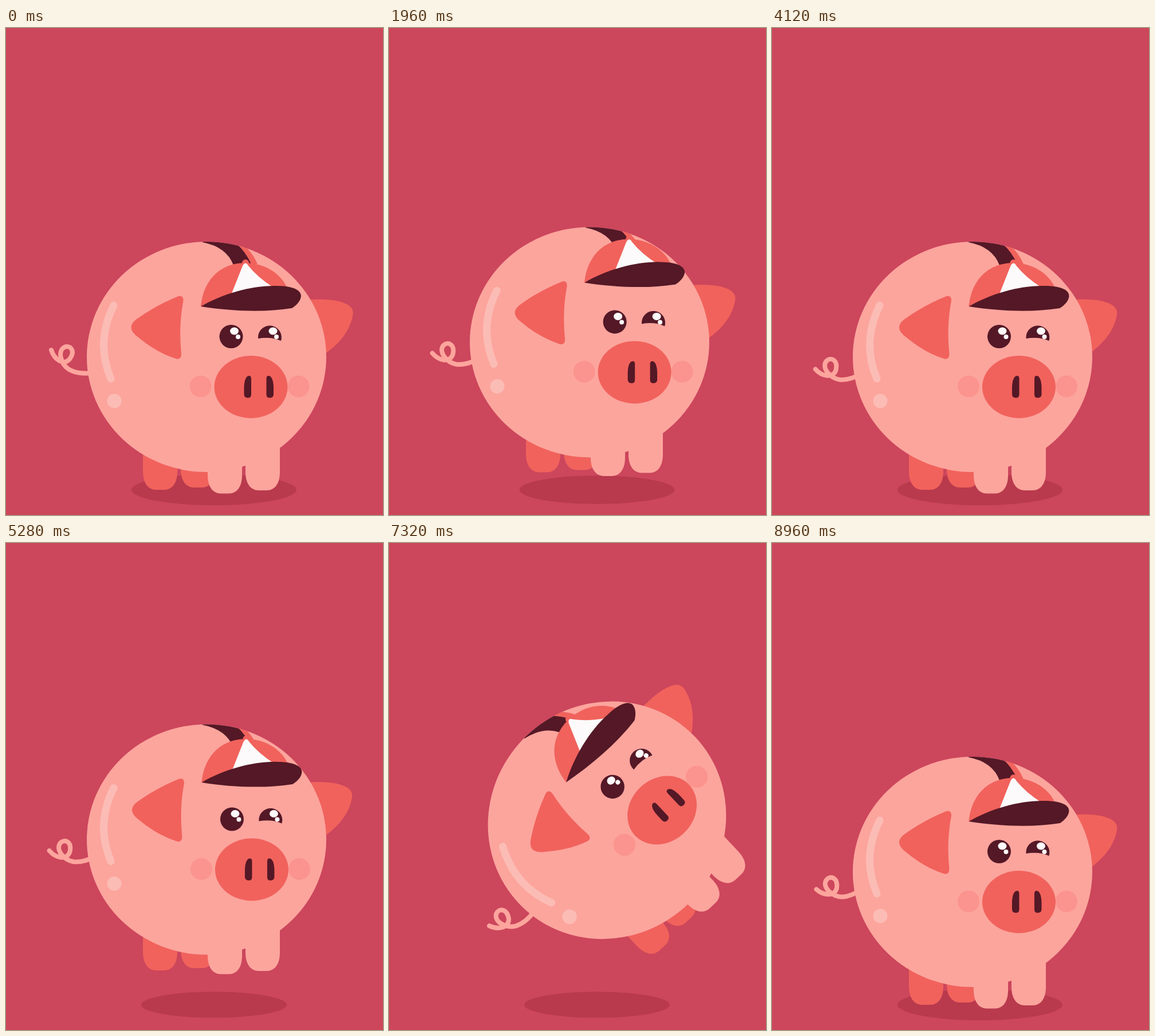
An HTML page that plays this animation: 658 px wide and 850 px high, repeating every 9000 ms.

```html
<!DOCTYPE html>
<html lang="en">
<head>
<meta charset="utf-8">
<title>Hopping piggy bank</title>
<style>
  html, body { margin: 0; width: 100%; height: 100%; overflow: hidden; background: #cc465c; }
  svg { display: block; width: 100vw; height: 100vh; }
  .skin { fill: #fca59d; }
  .red { fill: #f1625c; }
  .dark { fill: #541826; }
  .white { fill: #fcfafa; }
  .cheek { fill: #fb948e; }
  .line { fill: none; stroke-linecap: round; stroke-linejoin: round; }
</style>
</head>
<body>
<svg viewBox="0 0 658 850">
  <defs>
    <clipPath id="bodyClip"><ellipse cx="350" cy="574" rx="209" ry="201"/></clipPath>
    <path id="leg" d="M-30 -82V-32C-30 -12 -21 0 -7 0H7C21 0 30 -12 30 -32V-82Z"/>
    <path id="nostril" d="M6 -14V14Q6 19.500 0 19.500Q-6.500 19.500 -6.500 13V0Q-5.500 -18 2 -19Q6 -19 6 -14Z"/>
  </defs>
  <ellipse id="shadow" cx="363" cy="806" fill="#b93a4d"/>
  <g id="pig">
    <path id="tail" class="line" stroke="#fca59d" stroke-width="8"
      d="M79 562C84 578 100 590 111 578C122 563 112 553 102 557C89 564 96 587 110 596Q126 605 150 602L170 598"/>
    <path id="farEar" class="red" d="M530 474Q570 472 590 480Q609 487 605 503Q598 540 555 570L500 560Z"/>
    <g id="legs">
      <g class="red">
        <use href="#leg" x="269" y="806"/>
        <use href="#leg" x="335" y="802"/>
      </g>
      <g class="skin">
        <use href="#leg" x="382" y="812.5"/>
        <use href="#leg" x="448" y="807"/>
      </g>
    </g>
    <ellipse class="skin" cx="350" cy="574" rx="209" ry="201"/>
    <g clip-path="url(#bodyClip)">
      <path class="dark" d="M343 374L343 370H403V377Q418 390 429 411L397 414Q385 382 343 374Z"/>
      <path class="red" d="M402 376L412 376Q430 391 439 412H428Q418 390 402 376Z"/>
    </g>
    <path class="line" stroke="#fbbcb5" stroke-width="13" d="M188 484Q156 548 183 612"/>
    <circle cx="189" cy="651" r="12.5" fill="#fbbcb5"/>
    <g id="face">
      <path class="red" d="M301 468Q310 466 309.500 476Q301 520 306 569Q306 580 296 577Q262 566 231 540Q206 522 231 506Q262 484 301 468Z"/>
      <circle class="dark" cx="393" cy="538.500" r="20.500"/>
      <path class="dark" d="M440 542A20.500 20.500 0 1 1 480 546Q462 538 440 542Z"/>
      <g class="white">
        <ellipse cx="398.500" cy="529" rx="7.500" ry="6.500"/>
        <circle cx="405" cy="539" r="4"/>
        <ellipse cx="466" cy="529" rx="7.500" ry="6.500"/>
        <circle cx="472" cy="539" r="4"/>
      </g>
      <circle class="cheek" cx="339.500" cy="625.500" r="19"/>
      <circle class="cheek" cx="510.500" cy="625.500" r="19"/>
      <ellipse class="red" cx="427.500" cy="626.500" rx="64" ry="54.500"/>
      <g class="dark">
        <use href="#nostril" transform="translate(422 626)"/>
        <use href="#nostril" transform="translate(460.500 626) scale(-1 1)"/>
      </g>
      <g id="cap">
        <circle class="red" cx="418" cy="410" r="6"/>
        <path class="red" d="M340 486C343 450 365 411 417 410C450 410 478 427 490 452L430 478Z"/>
        <path class="white" d="M413 415Q418 406 423 415Q440 436 467 453L430 465L392 468Z"/>
        <path class="dark" d="M340 486C380 463 430 449 472 450C500 450 515 457 515 468C514 478 505 485 499 489C450 497 390 494 340 486Z"/>
      </g>
    </g>
  </g>
</svg>
<script>
const LOOP = 9000, HOP = 250, FLIP = 790;
const hops = [480, 730, 1766, 2016, 4880, 5130, 6166, 6416];
const flips = [2731, 7143];
const part = id => document.getElementById(id);
const [shadow, pig, tail, farEar, legs, face, cap] =
  ['shadow', 'pig', 'tail', 'farEar', 'legs', 'face', 'cap'].map(part);
const set = (el, value) => el.setAttribute('transform', value);

// Half sine wave for t inside [start, start + length]
function arc(t, start, length) {
  const x = (t - start) / length;
  return x > 0 && x < 1 ? Math.sin(Math.PI * x) : 0;
}
const hopAt = t => hops.reduce((sum, start) => sum + arc(t, start, HOP) ** 2, 0);
const sway = (t, period) => (1 - Math.cos(2 * Math.PI * t / period)) / 2;

function draw(now) {
  const t = now % LOOP;
  const air = flips.reduce((sum, start) => sum + arc(t, start, FLIP), 0);
  const spin = flips.reduce((sum, start) => {
    const x = (t - start) / FLIP;
    return x > 0 && x < 1 ? sum + 360 * sway(x, 2) : sum;
  }, 0);
  const height = 63 * hopAt(t) + 150 * air ** 1.5;
  const lift = 16 * hopAt(t - 70);
  const turn = 3.5 * sway(t, 1640);

  set(pig, `translate(350 ${530 - height}) rotate(${-spin}) scale(${1 + 0.07 * air ** 4}) translate(-350 -530)`);
  set(tail, `rotate(${-36 * sway(t, 724)} 155 586)`);
  set(farEar, `translate(${-turn} 0)`);
  set(face, `translate(${turn} 0)`);
  set(cap, `translate(0 ${-lift - 12 * air})`);
  set(legs, `translate(0 ${-lift * 0.31 - 10 * air})`);

  const shrink = Math.min(1, height / 50);
  shadow.setAttribute('rx', 144 - 17 * shrink);
  shadow.setAttribute('ry', 27 - 4.3 * shrink);
}

const begin = performance.now();
function tick() {
  draw(performance.now() - begin);
  requestAnimationFrame(tick);
}
tick();
</script>
</body>
</html>
```
